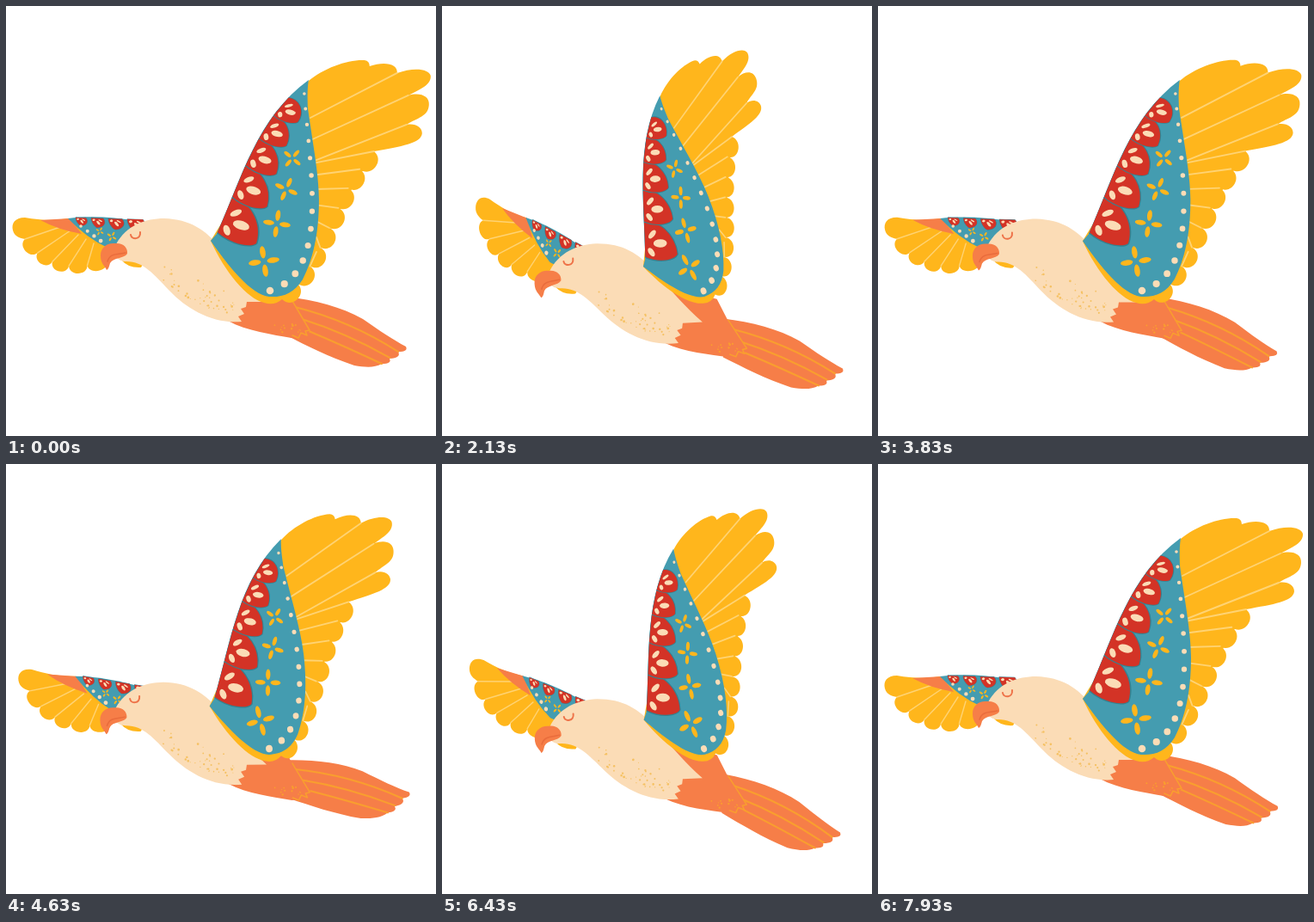
Animation, 500 px wide and 500 px high, one loop 8010 ms. Source, as an HTML page with a canvas:

```html
<!DOCTYPE html>
<html lang="en">
<head>
<meta charset="utf-8">
<title>Flying bird</title>
<style>
html, body { margin: 0; width: 100%; height: 100%; overflow: hidden; background: #fff; }
canvas { display: block; width: 500px; height: 500px; }
</style>
</head>
<body>
<canvas id="stage" width="500" height="500"></canvas>
<script>
const ctx = document.getElementById('stage').getContext('2d');
const LOOP = 8010, STEPS = 160, BEAT = 80;
const TAU = Math.PI * 2, DEG = Math.PI / 180;
const YELLOW = '#ffb61c', TEAL = '#449cb0', RED = '#d33326', CREAM = '#fbdcb6',
      ORANGE = '#f67e48', PALE = '#ffd373', AMBER = '#f99f2e', DEEP = '#35818f';

const shape = {
  cover: new Path2D('M352 86C350 100 351 110 351 118C356 155 364 195 364 225C364 265 357 295 345 318C335 334 322 339 306 338C285 336 258 302 238 273L245 265C275 198 292 130 352 86Z'),
  farSliver: new Path2D('M40 249L74 247 88 265Q60 260 40 249Z'),
  farCover: new Path2D('M72 247C95 244 125 245 152 250L170 262 150 282 118 281Q94 270 72 247Z'),
  chin: new Path2D('M134 295Q142 305 157 304L162 296Z'),
  body: new Path2D('M128 277C140 255 162 247 184 247C214 248 232 260 250 282C268 306 286 328 303 344L280 344 279 350 273 352 277 358 270 361 274 367C240 370 210 352 190 331C172 312 160 297 140 297C130 297 123 290 128 277Z'),
  rump: new Path2D('M258 366C280 378 310 382 332 386L345 384 353 378C345 360 335 350 331 340L321 318 262 300Z'),
  hem: new Path2D('M333 343L353 377 348 378 350 383 343 380 340 386 333 383'),
  tail: new Path2D('M326 338C360 342 390 350 415 364C435 378 450 388 465 396Q468 402 456 402Q460 409 446 410Q449 416 437 416C428 421 418 420 405 418C375 408 350 395 326 383Z'),
  beak: new Path2D('M127 276C136 275 142 281 141 288C137 294 125 292 121 299C120 303 119 306 117 307C115 302 110 300 110 290C110 281 117 275 127 276Z'),
  mouth: new Path2D('M139 287C130 289 121 287 118 297'),
  eye: new Path2D('M145 266C146 272 157 272 156 263'),
  scallop: new Path2D('M1 0C1.08 .4 .6 .95 0 1C-.16 .92 -.22 .45 0 0Z')
};

// Cubic curve through its control points, as a function of t
function curve(...p) {
  return t => [0, 1].map(j => {
    const u = 1 - t;
    return u * u * u * p[0][j] + 3 * u * u * t * p[1][j] + 3 * u * t * t * p[2][j] + t * t * t * p[3][j];
  });
}
const range = n => Array.from({ length: n }, (_, i) => i);

const leadingEdge = curve([245, 265], [275, 198], [292, 130], [352, 86]);
const trailingEdge = curve([428, 169], [378, 222], [375, 296], [321, 341]);
const dotLine = curve([347, 102], [353, 190], [378, 310], [307, 331]);
const farEdge = curve([22, 271], [45, 302], [77, 310], [118, 296]);

// Row of rounded feather ends along a curve, bulging to its side by h
function lobes(path, edge, n, h) {
  for (let i = 0; i < n; i++) {
    const [ax, ay] = edge(i / n), [bx, by] = edge((i + 1) / n);
    const len = Math.hypot(bx - ax, by - ay);
    const nx = (by - ay) / len * h, ny = (ax - bx) / len * h;
    path.bezierCurveTo(ax + nx, ay + ny, bx + nx, by + ny, bx, by);
  }
}

const plumes = new Path2D('M352 87C370 72 398 62 417 63Q423 64 423 70C440 64 456 67 455 78C474 71 492 73 494 81C495 92 481 97 468 104C482 100 493 105 492 115C491 129 478 130 466 138C476 136 484 141 484 148C483 160 460 163 428 169');
lobes(plumes, trailingEdge, 8, 17);
plumes.addPath(new Path2D('M352 87L428 169 376 258 321 341Q312 349 300 345C280 340 255 310 238 273Z'));

const farPlumes = new Path2D('M72 247C55 250 40 249 22 246C10 246 6 253 8 261C10 268 16 270 22 271');
lobes(farPlumes, farEdge, 5, -12);
farPlumes.lineTo(150, 260);

const seams = new Path2D();
[[455, 78], [468, 104], [466, 138]].forEach(([x, y], i) => {
  seams.moveTo(x, y);
  seams.lineTo(354 + 2.5 * i, 130 + 25 * i);
});
for (const i of range(7)) {
  const [x, y] = trailingEdge(i / 8);
  seams.moveTo(x, y);
  seams.lineTo(361, y + (x - 395) * 0.4);
}
const farSeams = new Path2D();
for (const i of range(5)) {
  farSeams.moveTo(...farEdge(i / 5));
  farSeams.lineTo(66 + 9 * i, 256 + 5 * i);
}
const quills = new Path2D();
for (const i of range(3)) {
  quills.moveTo(336 + 8 * i, 350 + 14 * i);
  quills.quadraticCurveTo(400 - 5 * i, 366 + 14 * i, 456 - 9.5 * i, 402 + 7 * i);
}

const dots = range(14).map(i => {
  const t = i / 13;
  return [...dotLine(t - 0.05 * Math.sin(Math.PI * t)), 1.8 + 2.5 * t];
});
const farDots = range(4).map(i => [87 + 7.7 * i, 256 + 5.7 * i, 1.8 + 0.2 * i]);

function seeded(seed) {
  return () => (seed = (seed * 16807) % 2147483647) / 2147483647;
}
const rnd = seeded(77);
const specks = range(48).map(() => {
  const s = rnd(), r = rnd();
  return [183 + 82 * s, 319 + 38 * Math.sin(s * Math.PI / 2) - 27 * r * r, 0.5 + rnd() * 0.9];
});
const rumpSpecks = range(14).map(() => [305 + rnd() * 38, 370 + rnd() * 11, 0.6 + rnd() * 0.6]);

function fill(path, color) {
  ctx.fillStyle = color;
  ctx.fill(path);
}
function stroke(path, color, width) {
  ctx.strokeStyle = color;
  ctx.lineWidth = width;
  ctx.stroke(path);
}
function oval(x, y, rx, ry, turn = 0) {
  ctx.beginPath();
  ctx.ellipse(x, y, rx, ry, turn, 0, TAU);
  ctx.fill();
}
function spots(list, color) {
  ctx.fillStyle = color;
  for (const [x, y, r] of list) oval(x, y, r, r);
}
function flower(x, y, r, turn) {
  ctx.fillStyle = YELLOW;
  for (let i = 0; i < 4; i++) {
    const a = (turn + i * 90) * DEG;
    oval(x + Math.cos(a) * r * 0.6, y + Math.sin(a) * r * 0.6, r * 0.4, r * 0.18, a);
  }
}
// Red half disc on the edge from p to q, reaching out by its length times (bx, by)
function scallop(p, q, bx, by) {
  const ex = q[0] - p[0], ey = q[1] - p[1], size = Math.hypot(ex, ey);
  ctx.save();
  ctx.transform(ex, ey, bx * size, by * size, p[0], p[1]);
  stroke(shape.scallop, DEEP, 0.06);
  fill(shape.scallop, RED);
  ctx.fillStyle = CREAM;
  for (let i = -1; i <= 1; i++) {
    const a = (95 + i * 50) * DEG, d = i ? 0.34 : 0.48;
    oval(0.4 + Math.cos(a) * d, Math.sin(a) * d, i ? 0.15 : 0.21, i ? 0.08 : 0.12, a);
  }
  ctx.restore();
}

// Linear map about (x, y), which itself moves by (dx, dy)
function warp(a, b, c, d, x, y, dx = 0, dy = 0) {
  ctx.transform(a, b, c, d, x + dx - a * x - c * y, y + dy - b * x - d * y);
}
function turn(angle, x, y, dx = 0, dy = 0) {
  const c = Math.cos(angle), s = Math.sin(angle);
  warp(c, s, -s, c, x, y, dx, dy);
}

function drawFarWing(k) {
  ctx.save();
  warp(1 - 0.15 * k + 0.25 * k * (1 - k), 0.4 * k, -0.308 * k, 1 - 0.02 * k, 72, 247, 25 * k, -k);
  fill(farPlumes, YELLOW);
  stroke(farSeams, PALE, 1.4);
  fill(shape.farSliver, ORANGE);
  fill(shape.farCover, TEAL);
  for (let i = 0; i < 4; i++) {
    const x = 81 + 17 * i + i * i, y = 246 + 0.6 * i;
    scallop([x, y], [x + 12 + 2 * i, y + 0.5], 0.5, 0.8);
  }
  flower(109, 262, 5, 30);
  flower(123, 268, 6, 30);
  spots(farDots, CREAM);
  ctx.restore();
}

function drawBody(sink, th) {
  const tilt = 0.045 * sink;
  ctx.save();
  turn(-tilt, 272, 368, sink, 24 * sink);

  ctx.save();
  turn(tilt + (1.1 * Math.cos(th) - 1.1 - 9.2 * Math.sin(th)) * DEG, 328, 362, 0, 3 * sink);
  fill(shape.tail, ORANGE);
  stroke(quills, AMBER, 2);
  ctx.restore();

  fill(shape.rump, ORANGE);
  stroke(shape.hem, AMBER, 1.5);
  spots(rumpSpecks, AMBER);
  fill(shape.chin, YELLOW);
  fill(shape.body, CREAM);
  spots(specks, '#f5c163');
  stroke(shape.eye, '#ee7248', 2);
  fill(shape.beak, ORANGE);
  stroke(shape.mouth, '#e96c3c', 1.5);
  ctx.restore();
}

function drawNearWing(k) {
  ctx.save();
  warp(1 - 0.266 * k, -0.314 * k, 0.335 * k, 1 - 0.128 * k + 0.08 * k * (1 - k), 305, 338);
  fill(plumes, YELLOW);
  stroke(seams, PALE, 1.9);
  fill(shape.cover, TEAL);
  ctx.save();
  ctx.clip(shape.cover);
  const at = i => leadingEdge(0.01 + 0.215 * i - 0.009 * i * i);
  for (let i = 0; i < 5; i++) scallop(at(i), at(i + 0.96), 1.05, 0.3);
  ctx.restore();
  for (let i = 0; i < 4; i++) flower(333 - 5 * i - 2 * i * i, 177 + 34 * i + 2 * i * i, 12 + 2 * i, 40 - 16 * i);
  spots(dots, CREAM);
  ctx.restore();
}

const swing = a => (1 - Math.cos(a)) / 2;

function draw(t) {
  // Steps alternate between 30 and 70 ms
  const step = Math.min(STEPS - 1, Math.floor(t / 100) * 2 + (t % 100 >= 30 ? 1 : 0));
  const th = TAU * step / BEAT;
  const lead = th + 0.06;
  const lift = (swing(lead) + 0.035 * (Math.cos(lead) - Math.cos(3 * lead))) / 0.95;
  const sink = swing(th - 0.03) / 0.95;

  ctx.fillStyle = '#fff';
  ctx.fillRect(0, 0, 500, 500);
  ctx.lineCap = ctx.lineJoin = 'round';
  drawFarWing(lift);
  drawBody(sink, th);
  drawNearWing(lift);
}

const start = performance.now();
function tick() {
  draw((performance.now() - start) % LOOP);
  requestAnimationFrame(tick);
}
tick();
</script>
</body>
</html>
```
